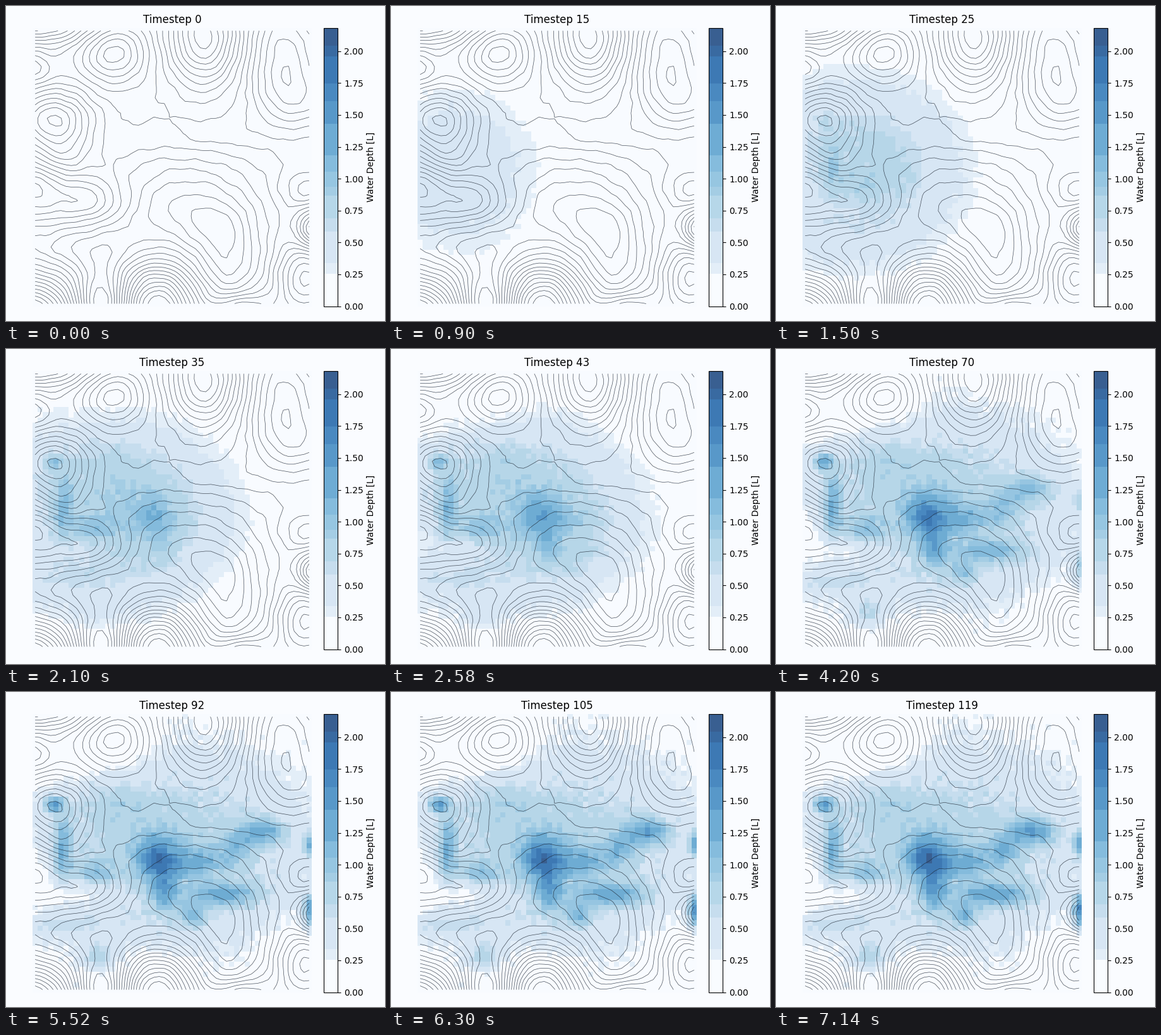
Animation of 600 by 500 pixels, one loop 7.2 s. Source, as a matplotlib script:

```python
import numpy as np
import matplotlib.pyplot as plt
from matplotlib.animation import FuncAnimation
from matplotlib.colors import ListedColormap

W, H, N, FRAMES = 600, 500, 54, 120
LEFT, RIGHT, TOP, BOTTOM = 42, 484, 35.2, 476.6
CELL = (RIGHT - LEFT) / N
VMAX = 2.18
PAPER = "#fafcff"

X, Y = np.meshgrid(LEFT + (np.arange(N) + 0.5) * CELL,
                   TOP + (np.arange(N) + 0.5) * (BOTTOM - TOP) / N)
rng = np.random.default_rng(8)
grain = rng.normal(0, 1, (N, N))


def bell(x, y, size, sx, sy):
    return size * np.exp(-((X - x) / sx) ** 2 / 2 - ((Y - y) / sy) ** 2 / 2)


def relief(features):
    return sum(bell(*f) for f in features)


def smooth(a):
    for axis in (0, 1):
        a = (np.roll(a, 1, axis) + 2 * a + np.roll(a, -1, axis)) / 4
    return a


# x, y, height, width, depth of each landform, one unit per contour
hills = [
    (170, 73, 5.4, 35, 33), (440, 80, 5.2, 38, 62), (470, 150, 2.6, 45, 32),
    (40, 100, 2.6, 20, 20), (330, 203, 1.2, 42, 16), (45, 290, 3.6, 24, 28),
    (125, 308, 3.8, 45, 23), (241, 482, 10, 40, 46), (30, 498, 13, 55, 44),
    (372, 486, 4, 28, 20), (472, 432, 5, 28, 36), (474, 292, 2.6, 28, 20),
]
hollows = [
    (312, 48, -9, 40, 54), (76, 180, -7.5, 42, 33), (92, 236, -2.4, 30, 22),
    (280, 315, -5.4, 90, 58), (335, 345, -1.6, 40, 28), (150, 478, -8, 28, 46),
    (125, 385, -3, 75, 26), (355, 415, -5, 42, 48), (488, 353, -7, 18, 22),
    (40, 22, -8, 75, 26),
]
height = 0.4 + relief(hills + hollows) + 0.25 * smooth(grain)

# Water gathers in pools and leaves high ground dry
pools = [
    (75, 178, 1.1, 11, 9), (90, 245, 0.75, 10, 36), (140, 288, 0.45, 24, 14),
    (165, 175, 0.25, 40, 25), (238, 260, 1.05, 22, 22), (250, 312, 0.8, 15, 24),
    (298, 270, 0.55, 32, 14), (407, 222, 0.95, 26, 15), (362, 250, 0.5, 17, 15),
    (482, 242, 1.1, 8, 15), (482, 348, 1.6, 8, 19), (350, 322, 0.75, 42, 13),
    (297, 356, 0.65, 14, 13), (148, 420, 0.65, 18, 14), (85, 372, 0.35, 45, 13),
]
dry = [
    (170, 75, -0.5, 42, 32), (110, 320, -0.35, 60, 16), (45, 290, -0.35, 16, 30),
    (60, 120, -0.3, 60, 22), (240, 455, -0.35, 50, 30), (455, 435, -0.3, 40, 50),
]
settled = bell(265, 250, 0.83, 185, 132) + relief(pools + dry) + 0.045 * grain
settled = np.clip(settled, 0, VMAX)
arrival = 10 + np.hypot(X - 110, Y - 262) / CELL


def depth(t):
    """Spreading flood that relaxes into the settled pools."""
    crest = min(0.033 * t, 1.05)
    flood = bell(min(75 + 2 * t, 190), 262, crest,
                 85 + 1.7 * min(t, 60), max(105, 120 - 0.4 * t))
    mix = 1 - np.exp(-np.maximum(t - arrival, 0) / 27)
    return (1 - mix) * flood * (1 + 0.04 * grain) + mix * settled


def banded_blues():
    cuts = np.array([0, .25, .34, .59, .69, .87, .94, 1.06, 1.18, 1.43, 1.61, 1.75, 1.96, 2.05, VMAX])
    mids = (cuts[:-1] + cuts[1:]) / 2
    mids[0] = 0
    tones = 0.2 + 0.8 * plt.get_cmap("Blues")(mids / VMAX)[:, :3]
    band = np.searchsorted(cuts, np.linspace(0.001, VMAX - 0.001, 256)) - 1
    return ListedColormap(tones[band])


def box(x0, x1):
    return [x0 / W, 1 - BOTTOM / H, (x1 - x0) / W, (BOTTOM - TOP) / H]


plt.rcParams["font.family"] = "DejaVu Sans"
fig = plt.figure(figsize=(W / 100, H / 100), dpi=100, facecolor=PAPER)
ax = fig.add_axes(box(LEFT, RIGHT))
water = ax.imshow(depth(0), cmap=banded_blues(), vmin=0, vmax=VMAX, aspect="auto",
                  interpolation="nearest", extent=(LEFT, RIGHT, BOTTOM, TOP))
ax.contour(X, Y, height, levels=np.arange(-14, 14), colors="#1c2430",
           linewidths=0.5, linestyles="solid", alpha=0.8)
ax.set_xlim(LEFT, RIGHT)
ax.set_ylim(BOTTOM, TOP)
ax.axis("off")
title = ax.set_title("Timestep 0", fontsize=12)
bar = fig.colorbar(water, cax=fig.add_axes(box(503.2, 525.3)))
bar.set_ticks(np.arange(0, 2.1, 0.25))
bar.set_label("Water Depth [L]")


def update(i):
    water.set_data(depth(i))
    title.set_text(f"Timestep {i}")
    return water, title


anim = FuncAnimation(fig, update, frames=FRAMES, interval=60, repeat=True,
                     repeat_delay=0, blit=False)
plt.show()
```
